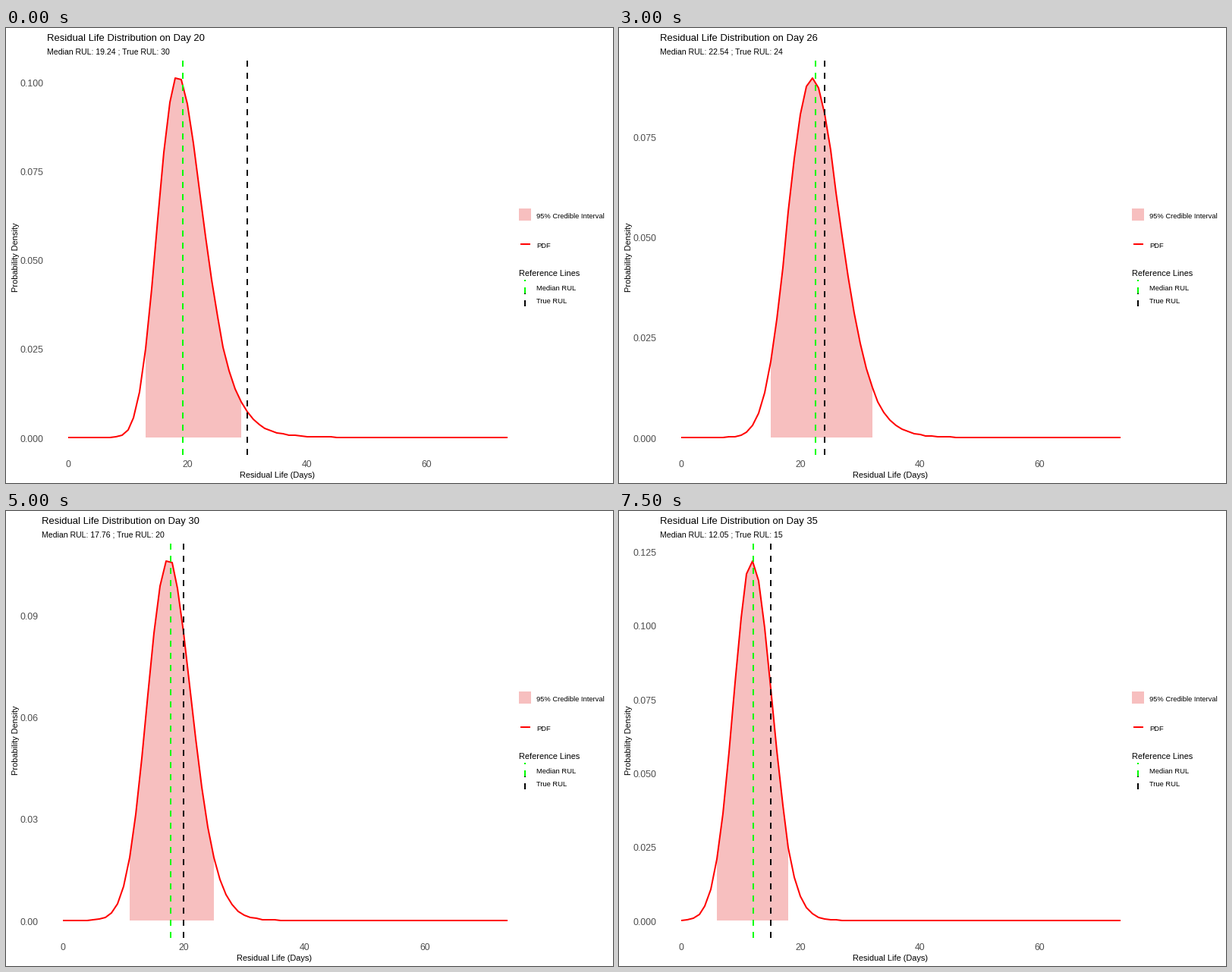
These frames come from a looping animation (800x600 px, 8 s). A matplotlib script:

```python
import numpy as np
import matplotlib.pyplot as plt
from matplotlib.animation import FuncAnimation
from matplotlib.patches import Rectangle

plt.rcParams["font.family"] = "Liberation Sans"

W, H, DPI = 800, 600, 100
PX = 72 / DPI
TOP, BOTTOM, RIGHT = 43, 563, 660
BASE, PEAK = 539.8, 65.6
GREY, PINK, RED, GREEN = "#4D4D4D", "#F7BFBF", "#FF0000", "#00FF00"

DAYS = np.arange(20, 36)
MEDIANS = [19.24, 19.56, 20.42, 20.75, 21.13, 21.52, 22.54, 21.43,
           20.77, 19.31, 17.76, 16.02, 15.17, 13.96, 12.81, 12.05]
KNOTS = [20, 24, 26, 28, 30, 33, 35]
NOISE = np.interp(DAYS, KNOTS, [7.53, 10.9, 13.3, 11.95, 11.07, 9.9, 9.71])
SLOPE = np.interp(DAYS, KNOTS, [.023, .016, .0135, .0128, .0094, .008, .007])
LIFE = np.append(np.arange(74), 73.58)

fig = plt.figure(figsize=(W / DPI, H / DPI), dpi=DPI, facecolor="white")
ax = fig.add_axes([0, 0, 1, 1])
ax.set_xlim(0, W)
ax.set_ylim(H, 0)
ax.axis("off")


def label(x, y, text="", size=11, color="black", va="baseline", **kw):
    return ax.text(x, y, text, fontsize=size * PX, color=color, va=va, **kw)


def stroke(xs, ys, color, **kw):
    return ax.plot(xs, ys, color=color, lw=2 * PX,
                   solid_capstyle="butt", **kw)[0]


def dashed(x, bottom, top, color):
    return stroke([x, x], [bottom, top], color, ls=(0, (4, 4)), zorder=4)


def density(m, c, d):
    """Residual life whose spread grows with the horizon; returns z and pdf."""
    s = np.sqrt(c + d * LIFE ** 2)
    z = (LIFE - m) / s
    pdf = np.exp(-z * z / 2) / np.sqrt(2 * np.pi) * (c + d * m * LIFE) / s ** 3
    return z, pdf


# Legend
ax.add_patch(Rectangle((676, 238), 16, 16, fc=PINK, lw=0))
stroke([678, 691], [285, 285], RED)
dashed(684, 350, 332, GREEN)
dashed(684, 367, 350, "black")
label(676, 327, "Reference Lines")
for y, text in [(251, "95% Credible Interval"), (290, "PDF"),
                (346, "Median RUL"), (363, "True RUL")]:
    label(699, y, text, 9.4)

# Chart
label(12.8, 302.5, "Probability Density", rotation=90, ha="center", va="center")
title = label(54, 17, size=13)
subtitle = label(54, 34, size=10.5)
x_title = label(357, 593, "Residual Life (Days)", ha="center")
x_ticks = [label(0, 579, str(v), 12.2, GREY, ha="center")
           for v in (0, 20, 40, 60)]
y_ticks = [label(18.5, 0, size=12.4, color=GREY) for _ in range(6)]
area = ax.fill([0, 1, 1], [0, 0, 1], color=PINK, lw=0)[0]
curve = stroke([], [], RED, zorder=3)
median_line = dashed(0, BOTTOM, TOP, GREEN)
true_line = dashed(0, BOTTOM, TOP, "black")


def draw(i):
    day, m, true = DAYS[i], MEDIANS[i], 50 - DAYS[i]
    short = 30 <= day <= 33
    left = 47.5 if short else 54.4
    step, digits = (.03, 2) if short else (.025, 3)
    unit = (RIGHT - left) / 77

    def to_x(v):
        return left + unit * (v + 3.5)

    z, pdf = density(m, NOISE[i], SLOPE[i])
    scale = (BASE - PEAK) / pdf.max()
    # Vertices sit on whole pixels
    xs, ys = np.round(to_x(LIFE)), np.round(BASE - scale * pdf)
    curve.set_data(xs, ys)
    inside = np.abs(z) <= 1.96
    cx, cy = xs[inside], ys[inside]
    area.set_xy(np.column_stack([np.r_[cx[0], cx, cx[-1]],
                                 np.r_[540, cy, 540]]))
    median_line.set_xdata([np.round(to_x(m))] * 2)
    true_line.set_xdata([np.round(to_x(true))] * 2)

    title.set_text(f"Residual Life Distribution on Day {day}")
    subtitle.set_text(f"Median RUL: {m:.2f} ; True RUL: {true}")
    title.set_x(left - .4)
    subtitle.set_x(left - .4)
    x_title.set_x((left + RIGHT) / 2)
    for n, tick in enumerate(x_ticks):
        tick.set_x(to_x(20 * n))
    for n, tick in enumerate(y_ticks):
        value = n * step
        tick.set_text(f"{value:.{digits}f}")
        tick.set_y(BASE - scale * value + 5.7)
        tick.set_visible(value <= 1.05 * pdf.max())
    return []


anim = FuncAnimation(fig, draw, frames=len(DAYS), interval=500,
                     init_func=lambda: draw(0), repeat=True, repeat_delay=0)
plt.show()
```
